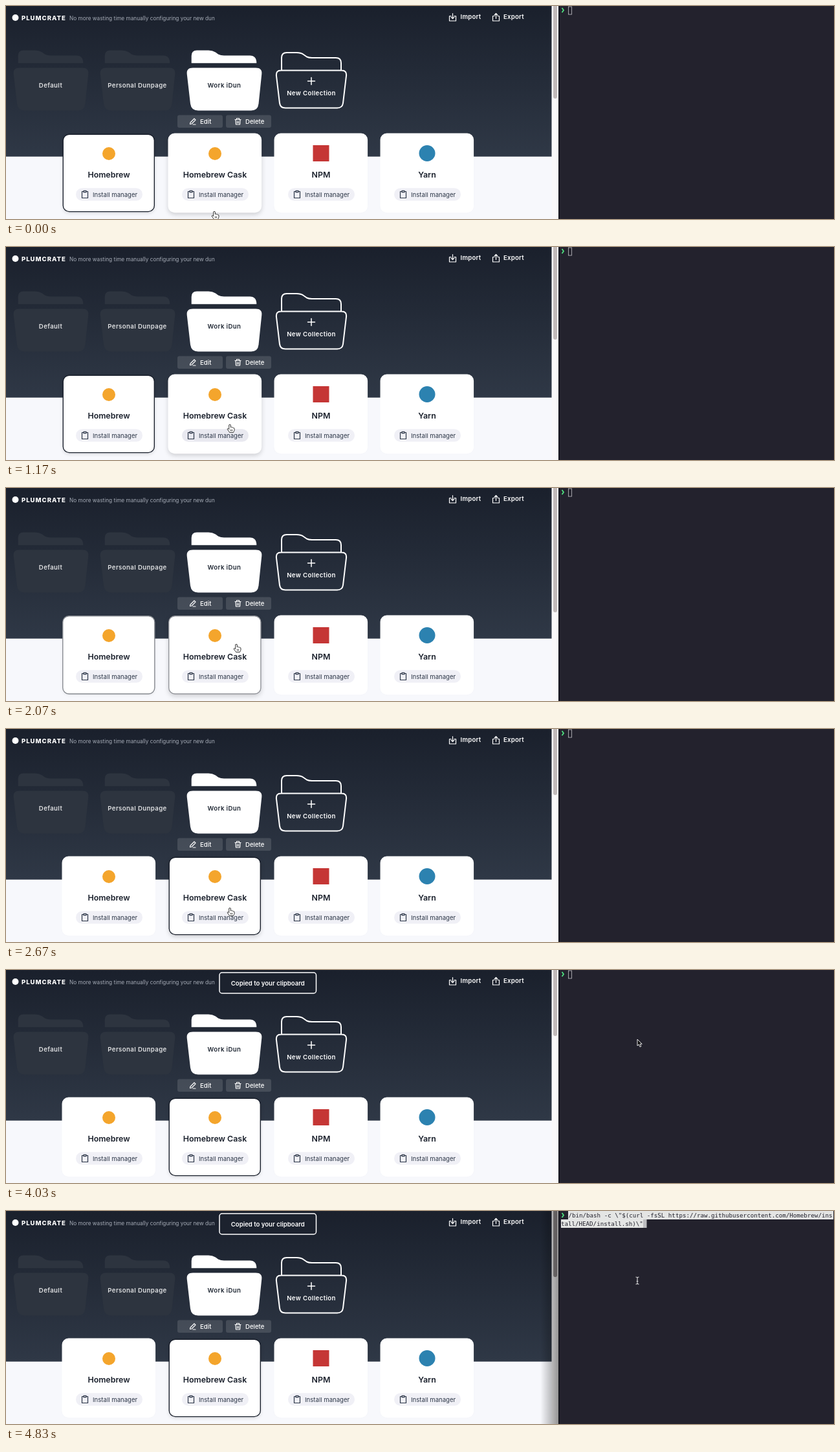
Write an HTML page that moves like this. It is 1280 by 329 pixels and loops after 4860 ms.

```html
<!DOCTYPE html>
<html lang="en">
<head>
<meta charset="utf-8">
<title>Package collections</title>
<style>
html, body { margin: 0; width: 100%; height: 100%; overflow: hidden; background: #f7f8fc; }
svg { display: block; }
text { font: 600 9.6px Inter, sans-serif; fill: #fff; }
.wide { letter-spacing: .025em; }
.mid { text-anchor: middle; }
.brand { font-weight: 800; letter-spacing: .1em; }
.tag { font-weight: 400; font-size: 8.25px; fill: #a5abb6; }
.medium { font-weight: 500; }
.title { font-size: 12.4px; fill: #1a202c; }
.label { font-weight: 400; fill: #2d3748; }
.mono { font: 9.17px "DejaVu Sans Mono", monospace; fill: #22212c; }
.line { fill: none; stroke: #fff; stroke-width: 1.2; stroke-linecap: round; stroke-linejoin: round; }
.dark { stroke: #2d3748; }
</style>
</head>
<body>
<svg width="1280" height="329" viewBox="0 0 1280 329">
  <defs>
    <linearGradient id="sky" x2="0" y2="1">
      <stop stop-color="#1a202c"/><stop offset="1" stop-color="#2f3846"/>
    </linearGradient>
    <linearGradient id="shade">
      <stop stop-color="#000" stop-opacity="0"/><stop offset="1" stop-color="#000" stop-opacity=".4"/>
    </linearGradient>
    <g id="folder">
      <path d="M18.700 88.300V77Q18.700 68.500 27 68.500H45Q51 68.500 56 71.500L60 74.500Q64 76.500 69 76.500H109Q119.300 76.500 119.300 88.300Z"/>
      <path d="M21 95.500H118Q128.300 95.500 127.300 105L122.500 151Q121.300 161.500 111 161.500H29Q18.500 161.500 17 151L11.700 105Q10.700 95.500 21 95.500Z"/>
    </g>
  </defs>

  <rect width="843.700" height="232.600" fill="url(#sky)"/>
  <circle cx="14.500" cy="18" r="5" fill="#fff"/>
  <text class="brand" x="24" y="22">PLUMCRATE</text>
  <text class="tag" x="98" y="21.500">No more wasting time manually configuring your new dun</text>
  <path class="line" d="M688 15.500H685.500V23H695.500V15.500H693M690.500 11.500V19.500M688 17L690.500 19.500L693 17"/>
  <text class="wide" x="702.500" y="20.400">Import</text>
  <path class="line" d="M755 15.500H752.500V23H762.500V15.500H760M757.500 19.500V11.500M755 14L757.500 11.500L760 14"/>
  <text class="wide" x="769" y="20.400">Export</text>

  <use href="#folder" fill="#2d343f"/>
  <use href="#folder" x="134" fill="#2d343f"/>
  <use href="#folder" x="268" fill="#fff"/>
  <g class="mid wide">
    <text x="69" y="126.300" opacity=".85">Default</text>
    <text x="203" y="126.300" opacity=".85">Personal Dunpage</text>
    <text x="337.500" y="126.300" style="fill:#1f2733">Work iDun</text>
    <text x="472" y="138.200">New Collection</text>
  </g>
  <path class="line" style="stroke-width:2" d="M426 99V80Q426 72 434 72H449Q456 72 460 75L465 78.500Q468 80 473 80H510Q518 80 518 88V99M425 99.500H519Q527 99.500 526 108L521 150Q520 157.500 512 157.500H432Q424 157.500 423 150L418 108Q417 99.500 425 99.500Z"/>
  <path class="line" style="stroke-width:1.500" d="M466.500 116H477.500M472 110.500V121.500"/>

  <g fill="#fff" fill-opacity=".125">
    <rect x="265" y="168.500" width="70" height="19.500" rx="3"/>
    <rect x="340" y="168.500" width="70" height="19.500" rx="3"/>
  </g>
  <path class="line" d="M285 180L291 174L293 176L287 182L284.500 182.500ZM289 183H293"/>
  <text class="medium" x="300" y="182">Edit</text>
  <path class="line" d="M354 175.500H363M356.500 175.500V173.500H360.500V175.500M355 175.500L355.500 183H361.500L362 175.500M357.500 178V181M359.500 178V181"/>
  <text class="medium" x="370" y="182">Delete</text>

  <g id="cards"></g>

  <g id="toast">
    <rect x="330" y="4" width="149.500" height="32" rx="4" fill="#1c222e" stroke="#fff" stroke-width="1.500"/>
    <text class="mid" x="404.800" y="23.600">Copied to your clipboard</text>
  </g>

  <rect x="843.700" width="10.300" height="329" fill="#f9f8f9"/>
  <rect id="thumb" x="846" y="-6" width="6" rx="3"/>
  <rect id="focus" x="826" width="28" height="329" fill="url(#shade)"/>
  <rect x="854" width="426" height="329" fill="#23222d"/>
  <rect x="854" width="1.500" height="329" fill="#111118"/>
  <path d="M859.500 3L862 6.500L859.500 10" fill="none" stroke="#4fe080" stroke-width="1.800"/>
  <rect id="caret" x="869.500" y="1" width="5" height="12" stroke="#c4c4c8" stroke-width=".8"/>
  <g id="paste">
    <path d="M869 0H1279V13H869ZM858 13H985V26H858Z" fill="#e4e5e4"/>
    <rect x="985" y="13" width="5.500" height="13" fill="#bdbdc0"/>
    <text class="mono" x="869.500" y="10">/bin/bash -c \"$(curl -fsSL https://raw.githubusercontent.com/Homebrew/ins</text>
    <text class="mono" x="858" y="23">tall/HEAD/install.sh)\"</text>
  </g>

  <g id="pointer">
    <path d="M-1.300 6V.9Q0-.5 1.300 .9V4.500Q2.500 3.700 3.400 4.900Q4.600 4.300 5.300 5.500Q7 5.200 7 7V9Q6.500 10.500 5.500 12.500H-.5Q-1.500 10.500-3.700 8Q-4 6.400-2.500 6.500L-1.300 7.700ZM1.500 8V10.500M3.500 8V10.500" fill="#fff" stroke="#222" stroke-width=".9" stroke-linejoin="round"/>
    <path d="M0 0V10L2.300 8L4 11.800L5.800 11L4.200 7.300H7.200Z" fill="#111" stroke="#fff" stroke-width=".9"/>
    <path d="M-2.500-5Q0-5 0-3.500Q0-5 2.500-5M0-4V5M-2.500 6Q0 6 0 4.500Q0 6 2.500 6M-1.300 1.500H1.300" fill="none" stroke="#ddd" stroke-width="1.100"/>
  </g>
</svg>
<script>
const $ = id => document.getElementById(id);
const LOOP = 4860;
const orange = '<circle cx="72" cy="31" r="10" fill="#f4a52c"/>';
const cards = [
  ['Homebrew', orange],
  ['Homebrew Cask', orange],
  ['NPM', '<rect x="59.500" y="18" width="25" height="25" fill="#c53635"/>'],
  ['Yarn', '<circle cx="72" cy="30.500" r="12.500" fill="#2c82b0"/>']
];
$('cards').innerHTML = cards.map(([name, logo], i) => `
  <g transform="translate(${87 + 164 * i} 197)">
    <rect class="box" x=".2" y=".3" width="143.200" height="121.200" rx="9.500" fill="#fff" stroke-width="1.400"/>
    ${logo}
    <text class="title mid" x="72" y="67.500">${name}</text>
    <rect class="pill" x="21" y="84.200" width="103" height="19.600" rx="9.800"/>
    <path class="line dark" d="M33 89.500H30.500V99.500H39.500V89.500H37M33 88.300H37V90.700H33Z"/>
    <text class="label" x="47" y="97.500">Install manager</text>
  </g>`).join('');
const boxes = document.querySelectorAll('.box');
const pills = document.querySelectorAll('.pill');
const shapes = $('pointer').children;

// pointer stops: time, x, y
const path = [
  [0, 322, 317], [560, 322, 318], [1080, 345, 287], [1170, 346, 274], [1450, 356, 241],
  [2150, 356, 241], [2600, 346, 274], [2670, 346, 276], [2790, 348, 288], [3620, 348, 288],
  [3730, 735, 193], [3860, 920, 128], [4030, 976, 107], [LOOP, 976, 107]
];
const ramp = (t, from, span = 150) => Math.min(1, Math.max(0, (t - from) / span));
const mix = (a, b, k) => a + (b - a) * k;
const rgb = (from, to, k) => `rgb(${from.map((v, i) => mix(v, to[i], k))})`;
const show = (el, on) => el.setAttribute('visibility', on ? 'visible' : 'hidden');

function pointerAt(t) {
  const i = path.findIndex(p => p[0] > t);
  const [t0, x0, y0] = path[i - 1], [t1, x1, y1] = path[i];
  const k = (t - t0) / (t1 - t0);
  return [mix(x0, x1, k), mix(y0, y1, k)];
}

function styleCard(box, selected, lift) {
  box.setAttribute('transform', `translate(71.8 60.9) scale(${1 - .015 * selected}) translate(-71.8 -60.9)`);
  box.setAttribute('stroke', rgb([255, 255, 255], [26, 32, 44], selected));
  box.style.filter = `drop-shadow(0 ${mix(.5, 3, lift)}px ${mix(1, 3.5, lift)}px rgba(0,0,0,${mix(.02, .16, lift)}))`;
}

function draw(t) {
  const [x, y] = pointerAt(t);
  const picked = ramp(t, 2000);
  const focused = t >= 4180, pasted = t >= 4600;
  const hover = ramp(t, 840) - ramp(t, 1070) + ramp(t, 2720) - ramp(t, 3640);

  [1 - picked, picked, 0, 0].forEach((selected, i) => {
    const over = i === 1 && t < 3640 ? 1 : 0;
    styleCard(boxes[i], selected, Math.max(selected * .7, over));
    pills[i].setAttribute('fill', rgb([240, 240, 246], [220, 220, 228], i === 1 ? hover : 0));
  });

  $('toast').setAttribute('opacity', ramp(t, 2880, 200));
  $('thumb').setAttribute('height', 6 + (t < 2040 ? 143 : t < 2250 ? 192 : 102));
  $('thumb').setAttribute('fill', focused ? '#969192' : '#c1baba');
  show($('focus'), focused);
  show($('paste'), pasted);
  show($('caret'), !pasted);
  $('caret').setAttribute('fill', focused ? '#c4c4c8' : 'none');

  const onCard = y >= 197 && x >= 87 && x < 723 && (x - 87) % 164 < 144;
  const kind = focused ? 2 : onCard ? 0 : 1;
  for (let i = 0; i < 3; i++) show(shapes[i], i === kind);
  $('pointer').setAttribute('transform', `translate(${x} ${y})`);
}

const start = performance.now();
function tick() {
  draw((performance.now() - start) % LOOP);
  requestAnimationFrame(tick);
}
tick();
</script>
</body>
</html>
```
